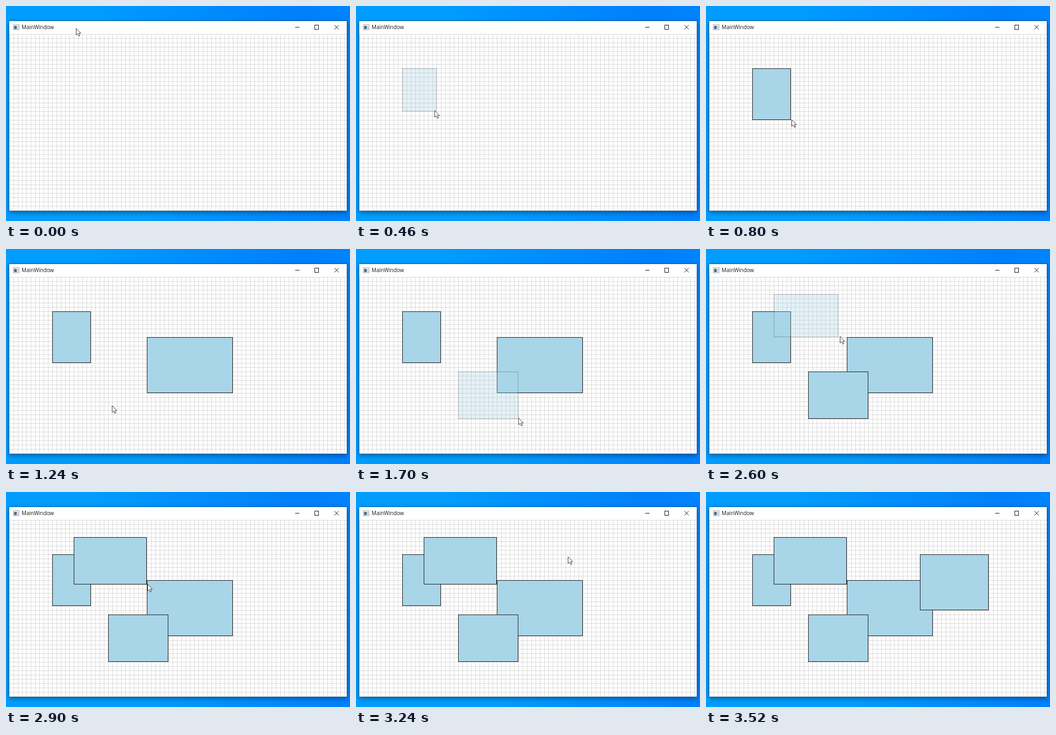
Write an HTML page that moves like this. It is 640x400 px and loops after 4140 ms.

```html
<!DOCTYPE html>
<html lang="en">
<head>
<meta charset="utf-8">
<title>Snap-to-grid rectangles</title>
<style>
  html, body { margin: 0; width: 100%; height: 100%; overflow: hidden; }
  body { position: relative; background: linear-gradient(75deg, #009dfe 35%, #008efe 60%, #007ffc 88%, #0084fe); }
  .window {
    position: absolute; left: 6px; top: 28px; width: 628px; height: 353px;
    background: #fff; outline: 1px solid rgba(0, 45, 90, .4);
    box-shadow: 0 3px 9px rgba(0, 0, 0, .4);
  }
  svg { position: absolute; left: 0; top: 0; width: 640px; height: 400px; }
  .title { font: 9.9px "Open Sans", "Noto Sans", sans-serif; fill: #1c1c1c; }
  .crisp { shape-rendering: crispEdges; }
  .line { fill: none; stroke: #1a1a1a; }
  .box { fill: #a8d5e8; stroke: #222; }
</style>
</head>
<body>
<div class="window"></div>
<svg viewBox="0 0 640 400">
  <defs>
    <pattern id="grid" x="6" y="52" width="8" height="8" patternUnits="userSpaceOnUse">
      <path class="crisp" d="M0 .5H8M.5 0V8" stroke="#dadada"/>
    </pattern>
  </defs>
  <rect x="6" y="52" width="628" height="329" fill="url(#grid)"/>

  <g class="crisp">
    <rect x="13.5" y="34.5" width="11" height="10" fill="#e9edf1" stroke="#b4bac1"/>
    <rect x="15" y="37" width="5" height="6" fill="#50708c"/>
    <rect x="21" y="37" width="2" height="6" fill="#c3ccd5"/>
  </g>
  <text class="title" x="29" y="43">MainWindow</text>
  <path class="line crisp" d="M538 39.5h8M574.5 35.5h7v8h-7z"/>
  <path class="line" d="M611 35.5l8 8m0-8l-8 8"/>

  <g id="boxes" class="crisp"></g>
  <path id="cursor" d="M.5 .5V13L3.5 10.3 5.5 15 7.5 14.2 5.6 9.6H9.2z" fill="#fff" stroke="#333" stroke-width=".9"/>
</svg>
<script>
  const LOOP = 4140, STEP = 20, REST = 60, CURSOR_GONE = 3520;
  const CELL = 8, LEFT = 6, TOP = 52, PREVIEW_OPACITY = 0.3;
  const ENTRY = [130, 41], EXIT = [601, 257];

  // Rectangles in grid cells; bend pulls the glide that leads to the press
  const boxes = [
    { press: 240, release: 740, col: 10, row: 8, cols: 9, rows: 12 },
    { press: 880, release: 1020, col: 32, row: 14, cols: 20, rows: 13 },
    { press: 1400, release: 1780, col: 23, row: 22, cols: 14, rows: 11, bend: [87, 335] },
    { press: 2280, release: 2880, col: 15, row: 4, cols: 17, rows: 11, bend: [240, 85] },
    { press: 3280, release: 3400, col: 49, row: 8, cols: 16, rows: 13, bend: [340, 180] }
  ];

  const cursor = document.getElementById("cursor");
  const layer = document.getElementById("boxes");

  const smooth = p => p * p * (3 - 2 * p);
  const easeOut = p => 1 - (1 - p) ** 3;
  const mix = (a, b, k) => a.map((v, i) => v + (b[i] - v) * k);
  const progress = (t, from, to) => Math.min(1, Math.max(0, (t - from) / (to - from)));

  // The hand grips each corner one pixel off the grid point
  const grip = (col, row) => [LEFT + col * CELL + 1, TOP + row * CELL - 1];
  const snap = (v, origin) => origin + Math.round((v - origin) / CELL) * CELL;

  function curve(a, b, k, bend = mix(a, b, 0.5)) {
    return mix(mix(a, bend, k), mix(bend, b, k), k);
  }

  const dragPoint = (b, t) => mix(b.start, b.end, easeOut(progress(t, b.press, b.release)));

  for (const b of boxes) {
    b.start = grip(b.col, b.row);
    b.end = grip(b.col + b.cols, b.row + b.rows);
    b.x = LEFT + b.col * CELL;
    b.y = TOP + b.row * CELL;
    b.el = document.createElementNS("http://www.w3.org/2000/svg", "rect");
    b.el.setAttribute("class", "box");
    b.el.setAttribute("x", b.x + 0.5);
    b.el.setAttribute("y", b.y + 0.5);
    layer.append(b.el);
  }

  function pointer(t) {
    let from = ENTRY, leave = 0;
    for (const b of boxes) {
      if (t < b.press) return curve(from, b.start, smooth(progress(t, leave, b.press)), b.bend);
      if (t < b.release + REST) return dragPoint(b, t);
      from = b.end;
      leave = b.release + REST;
    }
    return curve(from, EXIT, smooth(progress(t, leave, CURSOR_GONE)));
  }

  function draw(t) {
    const [cx, cy] = pointer(t).map(Math.round);
    cursor.setAttribute("transform", `translate(${cx} ${cy})`);
    cursor.style.display = t < CURSOR_GONE ? "" : "none";
    for (const b of boxes) {
      const [px, py] = dragPoint(b, t);
      b.el.setAttribute("width", Math.max(0, snap(px, LEFT) - b.x - 1));
      b.el.setAttribute("height", Math.max(0, snap(py, TOP) - b.y - 1));
      b.el.setAttribute("opacity", t < b.release ? PREVIEW_OPACITY : 1);
      b.el.style.display = t > b.press ? "" : "none";
    }
  }

  const start = performance.now();
  function tick() {
    const t = (performance.now() - start) % LOOP;
    draw(Math.floor(t / STEP) * STEP);
    requestAnimationFrame(tick);
  }
  tick();
</script>
</body>
</html>
```
